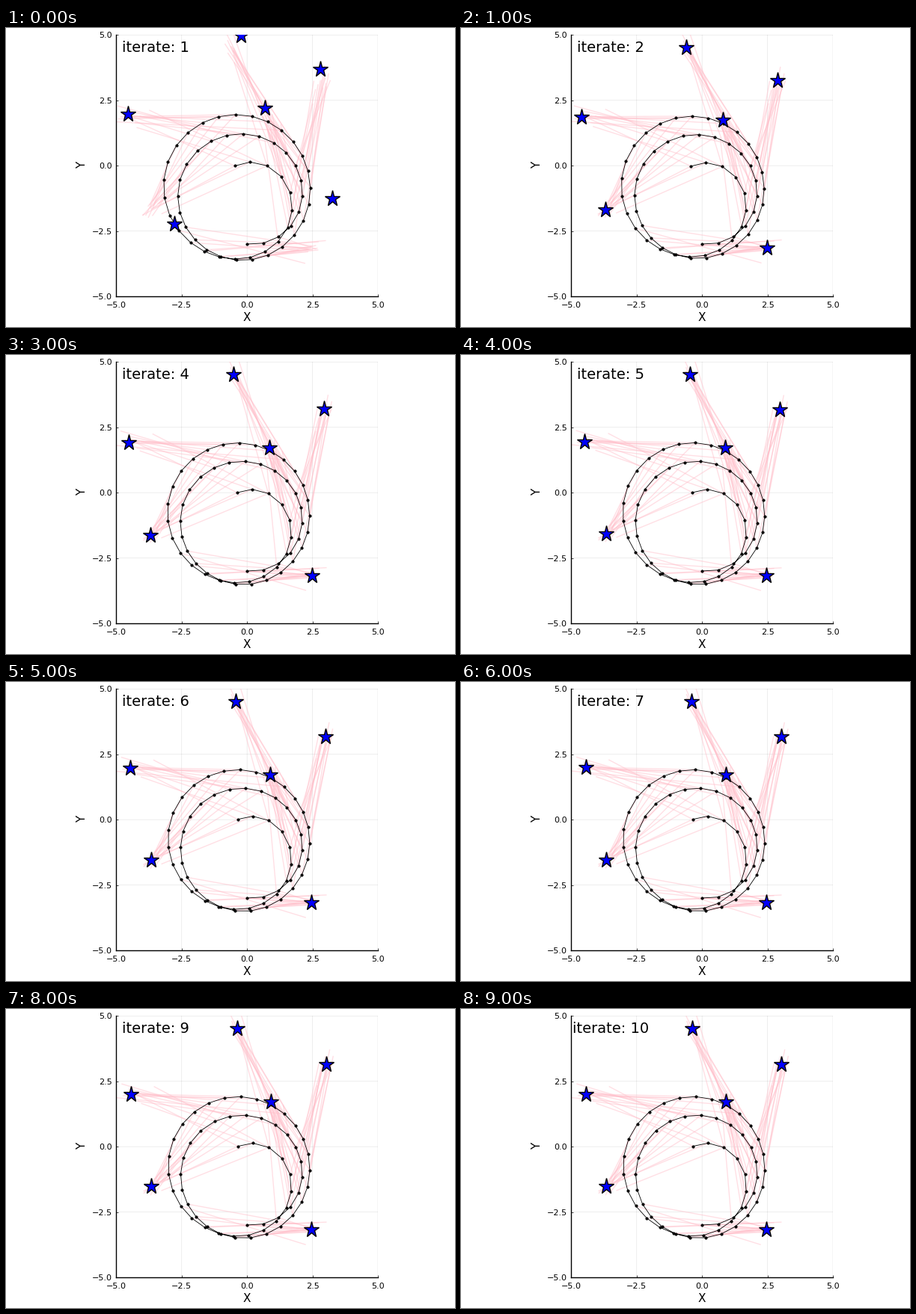
These frames come from a looping animation (600 by 400 pixels, 10 s). A matplotlib script:

```python
import numpy as np
import matplotlib.pyplot as plt
from matplotlib.animation import FuncAnimation
from matplotlib.collections import LineCollection

plt.rcParams["font.family"] = "DejaVu Sans"

W, H, DPI = 600, 400, 100
LEFT, BOTTOM, SIDE = 147.3, 359.0, 349.7
STEPS = 10
POSES = 61
SETTLE = 0.63
CENTER = -0.4 - 1.1j


def to_plane(points):
    """Stage pixels to plot coordinates, as complex numbers."""
    x, y = np.array(points, float).T
    return (x - LEFT) / SIDE * 10 - 5 + 1j * ((BOTTOM - y) / SIDE * 10 - 5)


def spline(values, count):
    """Cubic (not-a-knot) curve through evenly spaced values."""
    n = len(values)

    def basis(t):
        cols = [t**p for p in range(4)]
        cols += [np.maximum(t - k, 0) ** 3 for k in range(2, n - 2)]
        return np.stack(cols, axis=1)

    coef = np.linalg.solve(basis(np.arange(n, dtype=float)), values)
    return basis(np.linspace(0, n - 1, count)) @ coef


def orbit(points):
    """Smooth path around CENTER, splined in log radius and angle."""
    r = points - CENTER
    polar = np.log(np.abs(r)) + 1j * np.unwrap(np.angle(r))
    return CENTER + np.exp(spline(polar, POSES))


def heading(path):
    d = np.gradient(path)
    return d / np.abs(d)


# Settled solution: every sixth pose, and the landmarks
settled = orbit(to_plane([
    (322, 289), (394.5, 204.5), (299.5, 143.5), (235.5, 241.5), (327, 306),
    (406, 216), (335, 120.5), (224, 174), (265.5, 292), (374.5, 266),
    (310, 183.5)]))
landmarks = to_plane([(309.5, 26), (428.5, 74), (354.5, 124),
                      (167.5, 113.5), (194.5, 237), (407.5, 295.5)])
first_marks = to_plane([(314.5, 10), (419.5, 55), (345.5, 107),
                        (163.5, 115.5), (225.5, 262), (435.5, 228.5)])

# The start pose is fixed, so drift builds up along the path
GROWTH = 1 - np.exp(-np.arange(POSES) / 12)


def drift(z, shift, turn):
    return shift + turn * (z - CENTER)


def state(k):
    """Path and landmark estimates at step k."""
    if k == 0:
        error = drift(settled, -0.07 - 0.07j, 0.035 + 0.05j)
        return settled + GROWTH * error, first_marks
    shift, turn = -0.043 - 0.05j, 0.008 + 0.034j
    path = settled + SETTLE ** (k - 1) * GROWTH * drift(settled, shift, turn)
    # landmarks follow one step behind the path
    lag = SETTLE ** max(k - 2, 0)
    return path, landmarks + lag * drift(landmarks, shift, turn)


def observe(rng):
    """Noisy sightings: pose index, and offset in the robot's own frame."""
    offset = (landmarks - settled[:, None]) / heading(settled)[:, None]
    dist, angle = np.abs(offset), np.angle(offset)
    seen = (np.abs(angle) < 0.92) & (dist > 0.5) & (dist < 6)
    pose, mark = np.nonzero(seen)
    r = dist[pose, mark] * (1 + 0.08 * rng.standard_normal(len(pose)))
    a = angle[pose, mark] + 0.04 * rng.standard_normal(len(pose))
    return pose, r * np.exp(1j * a)


seen_from, sightings = observe(np.random.default_rng(4))

fig = plt.figure(figsize=(W / DPI, H / DPI), dpi=DPI, facecolor="white")
ax = fig.add_axes([LEFT / W, 1 - BOTTOM / H, SIDE / W, SIDE / H])
ax.set(xlim=(-5, 5), ylim=(-5, 5))
ticks = np.linspace(-5, 5, 5)
ax.set_xticks(ticks)
ax.set_yticks(ticks)
ax.set_axisbelow(True)
ax.grid(color="black", alpha=0.1, linewidth=0.5, snap=False)
ax.spines[["top", "right"]].set_visible(False)
ax.spines[["left", "bottom"]].set_linewidth(1)
ax.tick_params(direction="in", length=2.5, width=0.5, labelsize=8)
ax.tick_params(axis="x", pad=5)
ax.tick_params(axis="y", pad=3.8)


def label(x, y, text, size, **kw):
    return fig.text(x / W, 1 - y / H, text, fontsize=size, ha="center", **kw)


label(322, 392.5, "X", 11, va="baseline")
label(101.5, 183, "Y", 11, va="center", rotation=90)
title = label(199.9, 32, "", 14, va="baseline")

rays = LineCollection([], colors="pink", alpha=0.5, linewidths=1, zorder=2)
ax.add_collection(rays)
track, = ax.plot([], [], "-o", color="black", lw=0.6, ms=2.5, mew=0.4, zorder=3)
stars, = ax.plot([], [], "*", mfc="blue", mec="black", ms=15.3, mew=1, zorder=4)


def draw(k):
    path, marks = state(k)
    start = path[seen_from]
    end = start + sightings * heading(path)[seen_from]
    ends = np.stack([start, end], axis=1)
    rays.set_segments(np.stack([ends.real, ends.imag], axis=2))
    track.set_data(path.real, path.imag)
    stars.set_data(marks.real, marks.imag)
    title.set_text(f"iterate: {k + 1}")
    return rays, track, stars, title


anim = FuncAnimation(fig, draw, frames=STEPS, interval=1000,
                     repeat=True, repeat_delay=0, blit=False)
plt.show()
```
